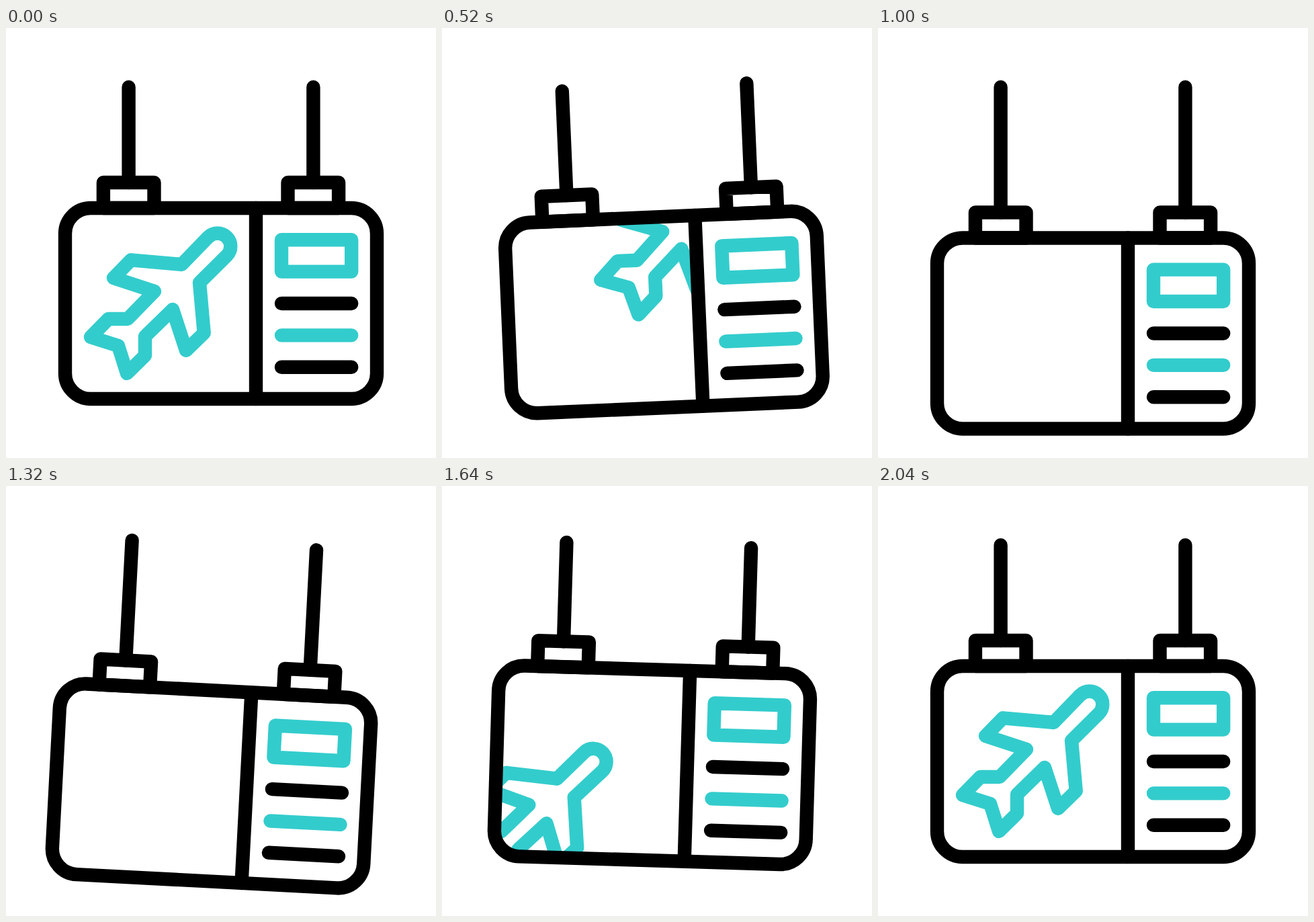
Animation of 640x640 px, one loop 2.08 s. Source, as an HTML page:

```html
<!DOCTYPE html>
<html lang="en">
<head>
<meta charset="utf-8">
<title>Swinging departure sign</title>
<style>
  html, body { margin: 0; width: 100%; height: 100%; overflow: hidden; background: #fff; }
  svg { display: block; width: 100%; height: 100%; }
  .ink { fill: none; stroke: #000; stroke-width: 20.4; stroke-linecap: round; stroke-linejoin: round; }
  .teal { stroke: #3cc; }
</style>
</head>
<body>
<svg viewBox="0 0 640 640">
  <clipPath id="pane"><path d="M372 268V552H126A38 38 0 0 1 88 514V306A38 38 0 0 1 126 268Z"/></clipPath>
  <g id="sign" class="ink">
    <path id="ropes"/>
    <g id="board">
      <g clip-path="url(#pane)">
        <path id="plane" class="teal" d="M301 311.2A19.5 19.5 0 0 1 328.6 338.8L288 379L294.7 454L268 480L248 419
          L207 459V487.5L180 514L167 473L126 460L152.5 433H181L221 392L160 372L186 345.3L261.5 352Z"/>
      </g>
      <rect x="88" y="268" width="464" height="284" rx="38"/>
      <path d="M372 268V552M144.9 230H220.5V268H144.9ZM419.5 230H495.1V268H419.5Z"/>
      <path d="M410 410H514.2M410 504.8H514.2"/>
      <path class="teal" d="M410 315.2H514.2V362.6H410ZM410 457.4H514.2"/>
    </g>
  </g>
</svg>
<script>
  const FRAME = 40, COUNT = 52;
  const DROP = 44.6, FLIGHT = 303, TILT = 3;
  const [sign, ropes, board, plane] = ['sign', 'ropes', 'board', 'plane'].map(id => document.getElementById(id));

  // Symmetric cubic-bezier(p, 0, 1 - p, 1) running from frame a to frame b
  function ease(n, a, b, p) {
    const u = Math.min(1, Math.max(0, (n - a) / (b - a)));
    let lo = 0, hi = 1;
    for (let i = 0; i < 30; i++) {
      const s = (lo + hi) / 2, r = 1 - s;
      const x = 3 * p * s * r * r + 3 * (1 - p) * s * s * r + s * s * s;
      if (x < u) lo = s; else hi = s;
    }
    return u === 0 || u === 1 ? u : lo * lo * (3 - 2 * lo);
  }

  function draw(n) {
    const angle = TILT * (-ease(n, 1.5, 18, 0.45) + 2 * ease(n, 18, 32, 0.45) - ease(n, 34.2, 49, 0.45));
    const drop = DROP * (ease(n, 3.6, 26.4, 0.6) - ease(n, 25.6, 47.4, 0.6));
    // Leaves at the upper right, comes back from the lower left
    const fly = FLIGHT * (n < 26.5 ? ease(n, 2, 27.5, 0.6) : ease(n, 26, 51, 0.6) - 1);

    sign.setAttribute('transform', `rotate(${angle} 320 180)`);
    board.setAttribute('transform', `translate(0 ${drop})`);
    plane.setAttribute('transform', `translate(${fly} ${-fly})`);
    ropes.setAttribute('d', `M182.6 88V${230 + drop}M457.4 88V${230 + drop}`);
  }

  const start = performance.now();
  function tick() {
    draw(Math.floor((performance.now() - start) / FRAME) % COUNT);
    requestAnimationFrame(tick);
  }
  tick();
</script>
</body>
</html>
```
